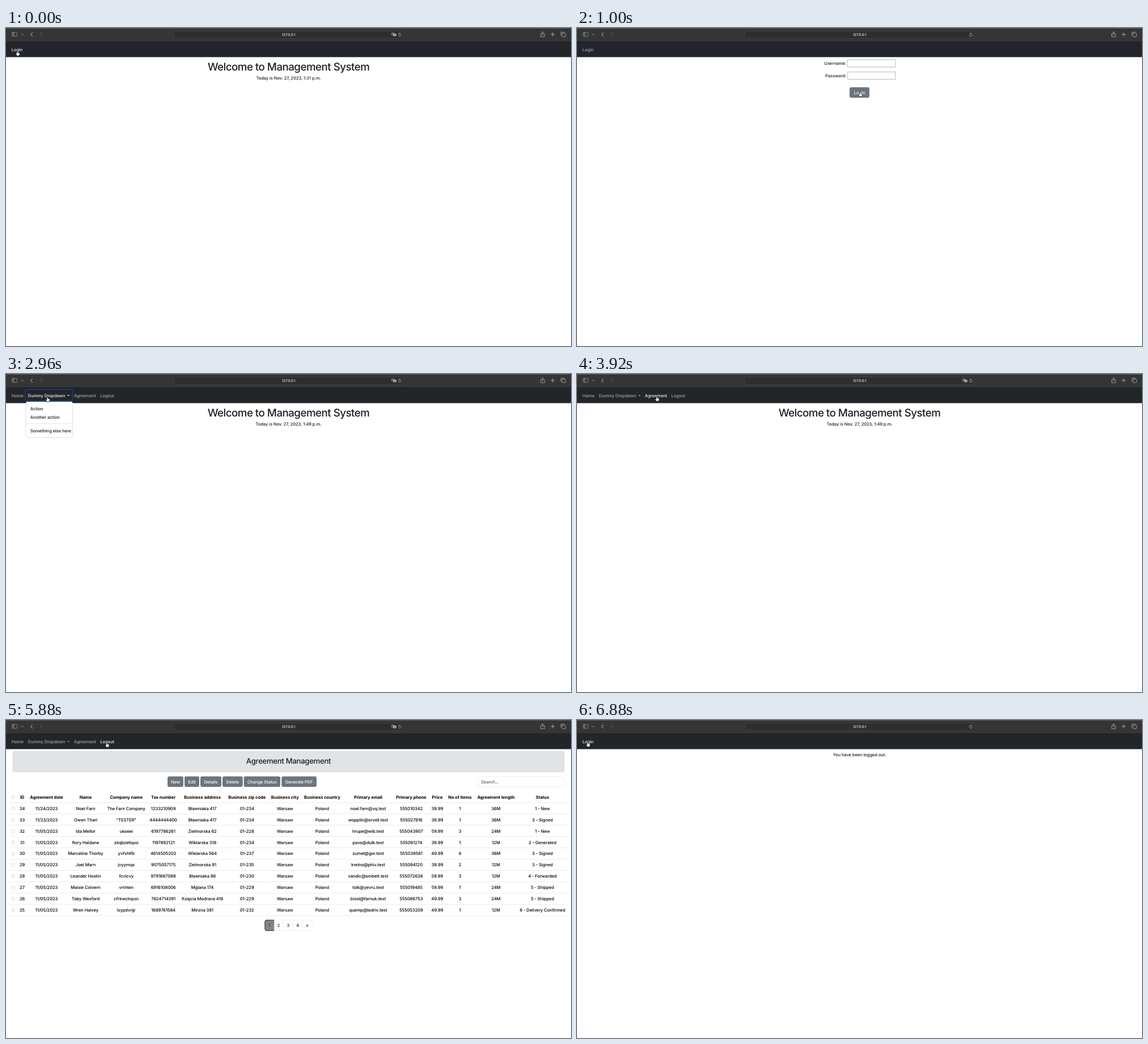
Animation of 997 by 561 pixels, one loop 7.84 s. Source, as an HTML page with a canvas:

```html
<!DOCTYPE html>
<html lang="en">
<head>
<meta charset="utf-8">
<title>Management System</title>
<style>
  html, body { margin: 0; width: 100%; height: 100%; overflow: hidden; background: #fff; }
  canvas { display: block; width: 997px; height: 561px; }
</style>
</head>
<body>
<canvas id="stage"></canvas>
<script>
const W = 997, H = 561, LOOP = 7840, MID = 498.5;
const INK = '#1b1f23', LINE = '#dee2e6', GREY = '#6c757d';
const canvas = document.getElementById('stage');
const ctx = canvas.getContext('2d');
const dpr = window.devicePixelRatio || 1;
canvas.width = W * dpr;
canvas.height = H * dpr;

// y is the vertical centre of the capitals
function text(str, x, y, opt = {}) {
  const { size = 7.6, weight = 450, color = INK, align = 'center', track = -0.014 } = opt;
  ctx.font = `${weight} ${size}px Inter, Roboto, sans-serif`;
  ctx.letterSpacing = track * size + 'px';
  ctx.textAlign = align;
  ctx.fillStyle = color;
  ctx.fillText(str, x, y + size * 0.36);
}

function box(x, y, w, h, r, fill, stroke, lw = 0.6) {
  ctx.beginPath();
  ctx.roundRect(x, y, w, h, r);
  if (fill) { ctx.fillStyle = fill; ctx.fill(); }
  if (stroke) { ctx.strokeStyle = stroke; ctx.lineWidth = lw; ctx.stroke(); }
}

function path(d, stroke, lw = 0.9) {
  ctx.strokeStyle = stroke;
  ctx.lineWidth = lw;
  ctx.lineCap = ctx.lineJoin = 'round';
  ctx.stroke(new Path2D(d));
}

function fill(d, color) {
  ctx.fillStyle = color;
  ctx.fill(new Path2D(d));
}

function rect(x, y, w, h, color) {
  ctx.fillStyle = color;
  ctx.fillRect(x, y, w, h);
}

function button(label, x1, x2, y) {
  box(x1, y, x2 - x1, 18.5, 3, GREY);
  text(label, (x1 + x2) / 2, y + 9.4, { color: '#fff' });
}

function toolbar(translate) {
  const icon = '#b4b4b4';
  rect(0, 0, W, 24, '#353535');
  rect(0, 0, W, 1, '#5c5c5c');
  box(10.8, 7.8, 8.8, 7, 1.3, null, icon);
  path('M13.9 8V14.6M11.9 9.6h.9M11.9 11h.9M11.9 12.4h.9', icon, 0.6);
  rect(24, 7, 0.6, 9, '#444');
  path('M27.6 11l1.5 1.4 1.5-1.4', icon, 0.9);
  path('M46.6 8.3l-3.2 3.2 3.2 3.2', '#c4c4c4', 1);
  path('M60.8 8.3l3.2 3.2-3.2 3.2', '#646464', 1);

  box(296.3, 5.3, 404.6, 13.2, 3, '#2e2e2e', '#4a4a4a');
  text('127.0.0.1', MID, 11.8, { size: 6.2, weight: 500, color: '#ececec' });
  if (translate) {
    box(680.4, 8.7, 5, 4.4, 1.2, null, '#b0b0b0', 0.7);
    path('M681.7 10h2.4M682.9 9.6v.4M684 10q-.6 1.6-2 2M682 10.4q.6 1.2 1.8 1.6', '#b0b0b0', 0.4);
    box(683.6, 10.1, 5, 4.3, 1.2, '#c8c8c8');
    path('M685 13.4l1.1-2.4 1.1 2.4M685.4 12.7h1.4', '#333', 0.5);
  }
  path('M697.2 10.6A2.6 2.6 0 1 1 695 9.4', '#c0c0c0', 0.8);
  path('M694.5 8l1.4 1.4-1.4 1.3', '#c0c0c0', 0.7);

  path('M945.3 10H943.6V15.4H950.3V10H948.6M946.95 12.4V6.9M945.3 8.4l1.65-1.6 1.65 1.6', icon, 0.8);
  path('M961.6 11.4h6.2M964.7 8.3v6.2', icon, 0.9);
  box(981, 9, 6.3, 6.3, 1.3, null, icon, 0.8);
  path('M979.1 12.8V8.4Q979.1 7.2 980.3 7.2H984.8', icon, 0.8);
}

function nav(items, hot) {
  rect(0, 24, W, 27.4, '#22262a');
  rect(0, 24, W, 1, '#17191b');
  for (const [label, x] of items) {
    const color = label === hot ? '#ebeced' : '#a0a2a4';
    text(label, x, 38, { align: 'left', color });
    if (label === 'Dummy Dropdown') fill('M108 36.9h4.4l-2.2 2.2z', color);
  }
}

const GUEST = [['Login', 9.8]];
const MEMBER = [['Home', 9.8], ['Dummy Dropdown', 38.6], ['Agreement', 119.8], ['Logout', 166.3]];

function welcome(time) {
  text('Welcome to Management System', MID, 68, { size: 18.8, weight: 500, track: -0.029 });
  text(`Today is Nov. 27, 2023, ${time} p.m.`, MID, 88.4);
}

function loginForm() {
  ['Username:', 'Password:'].forEach((label, i) => {
    const y = 62.5 + i * 21.5;
    text(label, 475, y, { align: 'right' });
    box(478, y - 6.5, 84, 13, 0, '#fff', '#8a8a8a');
  });
  button('Login', 481, 516, 104.5);
}

function menu() {
  box(34, 27, 83, 20.6, 2.5, null, 'rgba(13,110,253,.3)', 2);
  box(35, 49, 82.6, 63.6, 3, '#fff', '#c9cbcd');
  ['Action', 'Another action', 'Something else here'].forEach((label, i) =>
    text(label, 42.7, 60.8 + i * 15.4 + (i === 2 ? 8.2 : 0), { align: 'left' }));
  rect(35, 87.5, 82.6, 0.6, '#d3d4d5');
}

const COLS = [
  ['ID', 28.5], ['Agreement date', 71.5], ['Name', 140.5], ['Company name', 212.2],
  ['Tax number', 277.6], ['Business address', 346.6], ['Business zip code', 425.2],
  ['Business city', 492.2], ['Business country', 558], ['Primary email', 639],
  ['Primary phone', 715], ['Price', 761], ['No of items', 801],
  ['Agreement length', 864.5], ['Status', 946.6]
];
// date | name | company | tax | address | zip | email | phone | price | items | length | status
const ROWS = `11/24/2023|Noel Farn|The Farn Company|1233210909|Bławniaka 417|01-234|noel.farn@vq.test|555010342|39.99|1|36M|1 - New
11/23/2023|Owen Tharl|"TESTER"|4444444400|Bławniaka 417|01-234|wopplin@orvell.test|555027816|39.99|1|36M|3 - Signed
11/05/2023|Ida Mellor|ukoeei|6197786261|Zielmorska 62|01-228|hrupe@wib.test|555043907|59.99|3|24M|1 - New
11/05/2023|Rory Haldane|zkqbzetiqxo|1197892121|Wiklarska 318|01-234|pavo@dulk.test|555061274|39.99|1|12M|2 - Generated
11/05/2023|Marceline Thorby|yvfxhlfb|4614505203|Wiklarska 564|01-237|zumel@gor.test|555038561|49.99|4|36M|3 - Signed
11/05/2023|Joel Marn|jvyymqx|9075057175|Zielmorska 91|01-235|krelno@phiv.test|555094120|39.99|2|12M|3 - Signed
11/05/2023|Leander Hostin|fcvicvy|9791667088|Bławniaka 86|01-230|vandic@ombelt.test|555072638|59.99|3|12M|4 - Forwarded
11/05/2023|Maisie Colvern|vrtnten|6916108006|Mglana 174|01-229|tolk@yevru.test|555019485|59.99|1|24M|5 - Shipped
11/05/2023|Toby Wexford|cfrkwclnpsn|7624714391|Księcia Modrana 418|01-229|bixol@farnuk.test|555086753|49.99|3|24M|5 - Shipped
11/05/2023|Wren Halvey|lsypdvrjjr|1689761584|Mirzna 381|01-232|quemp@lodriv.test|555053209|49.99|1|12M|6 - Delivery Confirmed`
  .split('\n').map((line, i) => {
    const cells = line.split('|');
    cells.splice(6, 0, 'Warsaw', 'Poland');
    return [34 - i, ...cells];
  });

function agreements() {
  box(12.2, 55.6, 972.8, 35.8, 3, '#e2e3e5', '#c4c8cb');
  text('Agreement Management', MID, 72.4, { size: 13.2, weight: 500, track: -0.025 });

  [['New', 285, 313], ['Edit', 315, 341], ['Details', 343, 380], ['Delete', 382, 417.7],
    ['Change Status', 419.7, 484], ['Generate PDF', 486.3, 548]].forEach(b => button(...b, 99.5));
  box(833, 99.5, 152, 18.4, 3, '#fff', LINE);
  text('Search...', 838.2, 109, { align: 'left', color: '#5f6368' });

  const check = y => box(10.3, y - 2.1, 5, 5, 0.8, '#fff', '#b9bcbf', 0.5);
  check(136);
  for (const [label, x] of COLS) text(label, x, 136, { weight: 700, track: -0.008, color: '#000' });
  rect(6, 145.5, 985, 0.7, LINE);
  ROWS.forEach((row, i) => {
    const y = 156 + i * 19.93;
    check(y);
    row.forEach((cell, j) => text(String(cell), COLS[j][1], y, { color: '#000' }));
    rect(6, y + 9.4, 985, 0.7, LINE);
  });

  box(456.8, 353, 83.4, 18.6, 3, '#fff', LINE);
  ['1', '2', '3', '4', '»'].forEach((label, i) => {
    const x = 472.6 + (i - 1) * 16.9;
    if (i) rect(x, 353, 0.6, 18.6, LINE);
    else box(456.9, 353, 15.8, 18.6, [3, 0, 0, 3], '#848484', '#2c2c2c', 1);
    text(label, i ? x + 8.3 : 464.8, 362.7, { color: i ? INK : '#383a3c' });
  });
}

function hand(x, y) {
  const d = 'M-1.5-3.6Q-.9-4.4-.3-3.6L.1-1.3Q.8-1.7 1.2-1.1Q2-1.4 2.2-.8Q3.2-1 3.2.1L3 2L2.3 3.8H-1.1L-3 1Q-3.4.1-2.5 0L-1.2.8Z';
  ctx.save();
  ctx.translate(x, y);
  path(d, '#111', 1.3);
  fill(d, '#fff');
  path('M.1 1.3V2.7M1.2 1.3V2.7', '#444', 0.35);
  ctx.restore();
}

const SCENES = [
  { at: 0, nav: GUEST, hot: 'Login', translate: true, body: () => welcome('1:31'), hand: [20.7, 45] },
  { at: 1000, nav: GUEST, body: loginForm, hand: [500, 117] },
  { at: 1960, nav: MEMBER, hot: 'Dummy Dropdown', translate: true, body: () => welcome('1:49'), hand: [73.8, 45] },
  { at: 2960, nav: MEMBER, hot: 'Dummy Dropdown', translate: true, body: () => { welcome('1:49'); menu(); }, hand: [73.8, 45] },
  { at: 3920, nav: MEMBER, hot: 'Agreement', translate: true, body: () => welcome('1:49'), hand: [141.5, 44] },
  { at: 4920, nav: MEMBER, hot: 'Agreement', translate: true, body: agreements, hand: [135.5, 43.3] },
  { at: 5880, nav: MEMBER, hot: 'Logout', translate: true, body: agreements, hand: [178.6, 44] },
  { at: 6880, nav: GUEST, hot: 'Login', body: () => text('You have been logged out.', MID, 61.3), hand: [19.6, 43.3] }
];

function draw(scene) {
  ctx.setTransform(dpr, 0, 0, dpr, 0, 0);
  ctx.textRendering = 'geometricPrecision';
  rect(0, 0, W, H, '#fff');
  toolbar(scene.translate);
  nav(scene.nav, scene.hot);
  scene.body();
  hand(...scene.hand);
}

const start = performance.now();
function tick() {
  const t = (performance.now() - start) % LOOP;
  draw(SCENES.findLast(s => s.at <= t));
  requestAnimationFrame(tick);
}
tick();
</script>
</body>
</html>
```
